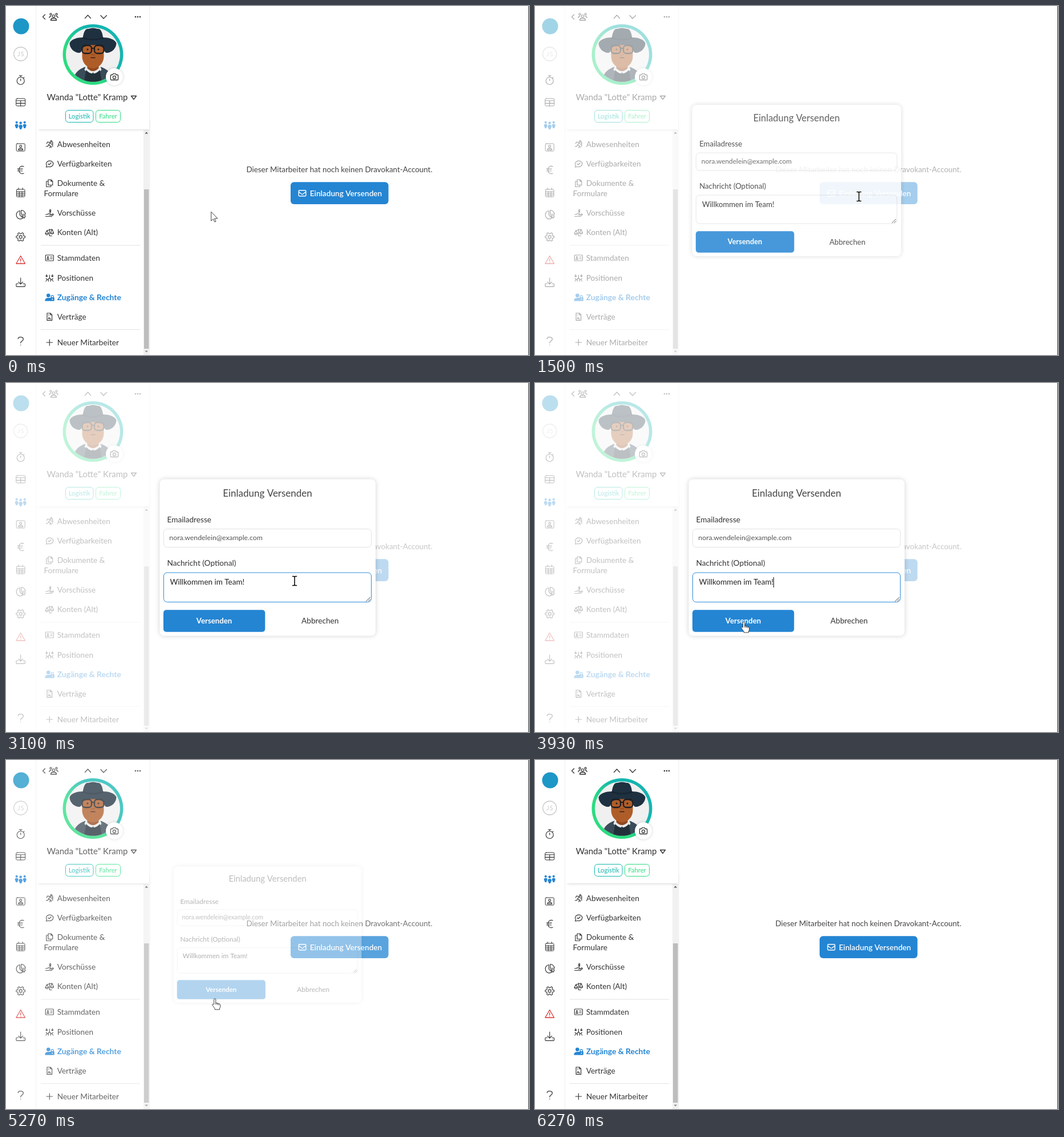
Write an HTML page with a canvas that moves like this. It is 917x611 px and loops after 7.26 s.

```html
<!DOCTYPE html>
<html lang="de">
<head>
<meta charset="utf-8">
<title>Einladung versenden</title>
<style>
html, body { margin: 0; width: 100%; height: 100%; overflow: hidden; background: #fff; }
canvas { display: block; }
</style>
</head>
<body>
<canvas id="stage" width="917" height="611"></canvas>
<script>
const W = 917, H = 611, LOOP = 7260;
const BLUE = '#2485d3', INK = '#333', TEAL = '#14b5b0', GREEN = '#2bdc80';
const FAMILY = 'Lato, "Open Sans", sans-serif';
const screen = document.getElementById('stage').getContext('2d');
const layer = document.createElement('canvas');
layer.width = W;
layer.height = H;
const layerCtx = layer.getContext('2d');
let c = screen;

// ---- drawing helpers ----
function at(x, y, draw) {
  c.save();
  c.translate(x, y);
  draw();
  c.restore();
}
function line(d, color = INK, width = 1.15) {
  c.strokeStyle = color;
  c.lineWidth = width;
  c.lineJoin = c.lineCap = 'round';
  c.stroke(new Path2D(d));
}
function fill(d, color = INK) {
  c.fillStyle = color;
  c.fill(new Path2D(d));
}
function disc(x, y, r, color) {
  c.beginPath();
  c.arc(x, y, r, 0, 7);
  c.fillStyle = color;
  c.fill();
}
function ring(x, y, r, color = INK, width = 1.15) {
  c.beginPath();
  c.arc(x, y, r, 0, 7);
  c.strokeStyle = color;
  c.lineWidth = width;
  c.stroke();
}
function box(x, y, w, h, r, paint, border, width = 1) {
  c.beginPath();
  c.roundRect(x, y, w, h, r);
  if (paint) { c.fillStyle = paint; c.fill(); }
  if (border) { c.strokeStyle = border; c.lineWidth = width; c.stroke(); }
}
function text(s, x, y, size = 13.65, color = INK, weight = 400, align = 'left') {
  c.font = `${weight} ${size}px ${FAMILY}`;
  c.textAlign = align;
  c.fillStyle = color;
  c.fillText(s, x, y + size * 0.355);
}
function person(x, y, s, color) {
  disc(x, y - 3.4 * s, 2 * s, color);
  box(x - 2.8 * s, y - 0.6 * s, 5.6 * s, 5 * s, 2 * s, color);
  box(x - 1.7 * s, y + 2 * s, 3.4 * s, 4.4 * s, s, color);
}

// ---- motion helpers ----
const clamp = v => Math.min(1, Math.max(0, v));
const span = (t, a, b) => clamp((t - a) / (b - a));
const smooth = u => u * u * (3 - 2 * u);
const bez = (u, a, b, d, e) =>
  a * (1 - u) ** 3 + 3 * b * u * (1 - u) ** 2 + 3 * d * u * u * (1 - u) + e * u ** 3;
function ease(x) {
  let lo = 0, hi = 1;
  for (let i = 0; i < 20; i++) {
    const mid = (lo + hi) / 2;
    if (bez(mid, 0, 0.25, 0.25, 1) < x) lo = mid; else hi = mid;
  }
  return bez(lo, 0, 0.1, 1, 1);
}
const along = (u, p, q, r, s) => [bez(u, p[0], q[0], r[0], s[0]), bez(u, p[1], q[1], r[1], s[1])];

// ---- left icon bar ----
function gear() {
  c.beginPath();
  for (let i = 0; i <= 96; i++) {
    const a = i / 96 * Math.PI * 2;
    const r = 6.7 + 1.1 * Math.tanh(3 * Math.cos(6 * a + Math.PI));
    c.lineTo(Math.sin(a) * r, Math.cos(a) * r);
  }
  c.strokeStyle = INK;
  c.lineWidth = 1.15;
  c.stroke();
  ring(0, 0, 2.5);
}
function nav() {
  disc(26.5, 35.5, 14, '#1d97c6');
  ring(25.7, 84, 12, '#c6c6c6', 1.3);
  c.letterSpacing = '1px';
  text('JS', 26.3, 84, 10.5, '#c8c8c8', 400, 'center');
  c.letterSpacing = '0px';
  at(25.7, 131, () => {
    ring(0, 0, 6.5);
    line('M0 0V-3.5M-2.5-9.3H2.5M0-9V-6.5M5-5L6.2-6.2');
  });
  at(25.7, 168.5, () => {
    box(-8, -6.5, 16, 13, 2, null, INK);
    line('M-8-2.8H8M-8 1.8H8M0-2.8V6.5');
  });
  person(18.7, 207.3, 1.05, BLUE);
  person(32.7, 207.3, 1.05, BLUE);
  box(21.7, 206, 8, 11, 3, '#fff');
  person(25.7, 208.6, 1.15, BLUE);
  at(25.7, 247.5, () => {
    box(-7.5, -6.5, 15, 13, 1.5, null, INK);
    ring(0, -1.8, 1.9);
    line('M-4 4.3Q-3.5 1.8-1.5 1.8H1.5Q3.5 1.8 4 4.3Z');
  });
  at(25.7, 287, () => line('M5.5-6C1-8-3-5-3 0S1 8 5.5 6M-5.5-1.7H3.5M-5.5 1.7H3'));
  at(25.7, 327, () => {
    box(-7.3, -6, 14.6, 13, 1.5, null, INK);
    line('M-7-2H7M-7 1H7M-7 4H7M-2.4-2V7M2.4-2V7M-3.5-8.5V-6M3.5-8.5V-6', INK, 1);
  });
  at(25.7, 365.5, () => {
    line('M-1.5-7A7.2 7.2 0 1 0 4 5.8L-1.5.4Z');
    line('M1-8A7.3 7.3 0 0 1 8.3-.8H1ZM2 1.5H8.3A7.5 7.5 0 0 1 6.2 5.8Z');
  });
  at(25.7, 404.3, gear);
  at(25.7, 445, () => line('M0-7.5L7.8 6H-7.8ZM0-2.5V1.5M0 3.8V4', '#d93636', 1.3));
  at(25.7, 484, () => line('M0-8V3M-3.8-.8L0 3L3.8-.8M-4 2H-6.5Q-7.8 2-7.8 3.3V6Q-7.8 7.3-6.5 7.3H6.5Q7.8 7.3 7.8 6V3.3Q7.8 2 6.5 2H4M5 4.7V4.8'));
  at(25.7, 586.5, () => line('M-4.5-4C-4-8 4.8-8 4.6-3C4.4 0 0 0 0 3.5M0 6.8V7', INK, 1.3));
  c.fillStyle = '#eee';
  c.fillRect(52, 0, 1, H);
  c.fillRect(251.5, 0, 1, H);
}

// ---- employee header ----
function face() {
  const dark = '#1d1d20';
  fill('M-35 50C-34 31-24 25-12 21H12C24 25 34 31 35 50Z', '#3a4b59');
  fill('M-13 21L-15 27L-4 36L0 31L4 36L15 27L13 21Z', '#e9ecec');
  fill('M-12 27Q0 40 12 27L16 50H-16Z', '#22303a');
  fill('M-10 8H10V24Q0 34-10 24Z', '#94491f');
  fill('M-19-20H19V3C19 15 10 24 0 24S-19 15-19 3Z', '#ae5d29');
  // hat: wide drooping brim below a dented crown
  fill('M-41-20C-38-27-28-30-17-30H17C28-30 38-27 41-20C41-11 33-3 24-3C21-3 20-6 19-10C14-19-14-19-19-10C-20-6-21-3-24-3C-33-3-41-11-41-20Z', '#1f3140');
  fill('M-18-27C-17-38-14-46-8-45Q0-48 8-45C14-46 17-38 18-27Z', '#1f3140');
  line('M-17.5-29Q0-23 17.5-29', '#172632', 2.5);
  box(-19, -16, 16.5, 14, 5, null, dark, 2.3);
  box(2.5, -16, 16.5, 14, 5, null, dark, 2.3);
  line('M-2.5-10Q0-12.5 2.5-10', dark, 2);
  disc(-9.5, -9, 1.5, dark);
  disc(9.5, -9, 1.5, dark);
  line('M-3-.5Q0 2 3-.5', '#94491f', 1.5);
  line('M-3.5 5.5H3.5', '#3a1f14', 1.6);
}
function avatar() {
  const g = c.createLinearGradient(178, 58, 122, 112);
  g.addColorStop(0.2, TEAL);
  g.addColorStop(0.8, GREEN);
  disc(152.5, 85, 53, g);
  disc(152.5, 85, 47.5, '#f0f0f0');
  c.save();
  c.beginPath();
  c.arc(152.5, 85, 47.5, 0, 7);
  c.clip();
  at(152.5, 85, face);
  c.restore();
  c.save();
  c.shadowColor = 'rgba(0,0,0,.2)';
  c.shadowBlur = 4;
  disc(190, 124, 15, '#fff');
  c.restore();
  at(190, 124.3, () => {
    line('M-5.3-3.8H-3.3L-2.3-5.6H2.3L3.3-3.8H5.3Q6.6-3.8 6.6-2.5V4Q6.6 5.2 5.3 5.2H-5.3Q-6.6 5.2-6.6 4V-2.5Q-6.6-3.8-5.3-3.8Z', INK, 1.3);
    ring(0, 0.6, 2.6, INK, 1.3);
  });
}
function header() {
  c.save();
  c.shadowColor = 'rgba(0,0,0,.14)';
  c.shadowBlur = 4;
  c.shadowOffsetY = 1;
  c.fillStyle = '#fff';
  c.fillRect(57, 200, 194, 15.5);
  c.restore();
  c.fillStyle = '#fff';
  c.fillRect(53, 0, 198, 215.5);
  line('M68.5 15L64.5 19L68.5 23M138.5 21.5L143.5 16L148.5 21.5M166 16.5L171 22L176.5 16.5', INK, 1.3);
  ring(78.5, 14.5, 1.6);
  ring(88.5, 14.5, 1.6);
  ring(83.5, 17.7, 2.2);
  line('M76 20.5Q76 18 78.8 18.2M91 20.5Q91 18 88.2 18.2M78.5 25Q79 21.5 81.5 21.5H85.5Q88 21.5 88.5 25Z', INK, 1.4);
  for (const x of [227, 231, 235]) disc(x, 19, 1.35, INK);
  avatar();
  text('Wanda "Lotte" Kramp', 142.5, 160, 15, INK, 400, 'center');
  line('M219.5 157.5H228.5L224 163.5Z', INK, 1.3);
  box(104.5, 182.5, 48.5, 21, 5, null, TEAL);
  text('Logistik', 128.7, 193, 11.3, TEAL, 400, 'center');
  box(157.5, 182.5, 43, 21, 5, null, GREEN);
  text('Fahrer', 179, 193, 11.3, GREEN, 400, 'center');
}

// ---- menu ----
const items = [
  ['Abwesenheiten', 242, 'M1.6-5a1.4 1.4 0 1 1 2.8 0a1.4 1.4 0 1 1-2.8 0M-5-1L-3.5-4L1-3L-1.5 1L1.5 3L.5 6.3M-1.5 1L-3 3.6L-6 4M1-3L3 0L6-.5M3 3V6M5.5-4V4'],
  ['Verfügbarkeiten', 276.5, 'M-6 5.5L-4.6 3A6.2 5.2 0 1 1-1.5 4.8Q-3.5 5.7-6 5.5M-2.5-.3L-.6 1.5L2.8-2'],
  ['Dokumente &', 310.5, 'M-2.3-6.5H2.5L5.5-3.5V3H-2.3ZM2.5-6.5V-3.5H5.5M-2.3-3.5H-5.5V6H2.5V3'],
  ['Vorschüsse', 362.5, 'M-6.8 2.5H-4L-2 1H1.5L2.5 2.5L1.5 3.5H-1M2.5 3.5L5.8 1.3L7 2.5L3 6H-6.8M2.8-5.2C.3-6.3-.8-4 1-3.6C3.6-3 2.5-.8-.6-2M1.1-6.8V-.4'],
  ['Konten (Alt)', 396.5, 'M0-6V6H4M-4-3.5L4-5.5M-4.5-3.5L-7.3 2H-1.7ZM4.5-5.5L1.7 1H7.3ZM-7 2.5Q-4.5 6-2 2.5M2 1.5Q4.5 4.5 7 1.5'],
  ['Stammdaten', 441, 'M-6-5H6Q7-5 7-4V4Q7 5 6 5H-6Q-7 5-7 4V-4Q-7-5-6-5M-4.6 2.5Q-4.4.7-2.8.7T-1 2.5ZM-3.8-1.5a1 1 0 1 1 2 0a1 1 0 1 1-2 0M1.5-1.5H4.8M1.5 1.5H4.8'],
  ['Positionen', 476, 'M-5-6V-2M-6.5-3.5L-5-2L-3.5-3.5M5-6V-2M3.5-3.5L5-2L6.5-3.5M0-5V-1M-6 1L-4 3L-6.5 6M6 1L4 3L6.5 6M-2 6V2L0 0L2 2V6M-4 3H-2M2 3H4'],
  ['Zugänge & Rechte', 510, ''],
  ['Verträge', 544, 'M-4.3-6.3H1.5L4.3-3.5V6.3H-4.3ZM1.3-6.3V-3.3H4.3M-2-3H-1M-2.2 3.8L-.8 1.2L.4 3.8H2.2'],
  ['Neuer Mitarbeiter', 589, 'M-5.3 0H5.3M0-5.3V5.3']
];
function menu() {
  for (const [label, y, icon] of items) {
    if (icon) {
      text(label, 89.7, y);
      at(76.3, y, () => line(icon));
    } else {
      text(label, 89.7, y, 13.85, BLUE, 700);
      at(76.3, y, () => {
        disc(-2, -3.3, 3.3, BLUE);
        fill('M-8 6.5C-8 2-5 1-2 1H2.5V6.5Z', BLUE);
        box(1.5, 0, 7, 6.5, 1, BLUE);
        line('M3 0V-1.5A1.9 1.9 0 0 1 6.8-1.5V0', BLUE, 1.3);
        disc(5, 3.2, 1, '#fff');
      });
    }
  }
  text('Formulare', 66.5, 328);
  c.fillStyle = '#e2e2e2';
  c.fillRect(61, 418.5, 174, 1);
  c.fillRect(61, 566, 174, 1);
  c.fillStyle = '#f1f1f1';
  c.fillRect(241, 217, 10.5, 394);
  c.fillStyle = '#bdbdbd';
  c.fillRect(242, 321, 8.5, 279);
  fill('M243.5 223.5L246.2 220.5L249 223.5Z', '#505050');
  fill('M243.5 603.5L246.2 606.5L249 603.5Z', '#8a8a8a');
}

function page() {
  c.fillStyle = '#fff';
  c.fillRect(0, 0, W, H);
  menu();
  header();
  nav();
  text('Dieser Mitarbeiter hat noch keinen Dravokant-Account.', 584.5, 286, 13.4, '#444', 400, 'center');
  box(499, 308.3, 171.6, 38.6, 6, BLUE);
  at(519.5, 327.7, () => line('M-5-5H5Q6.3-5 6.3-3.7V3.7Q6.3 5 5 5H-5Q-6.3 5-6.3 3.7V-3.7Q-6.3-5-5-5M-6.3-2.3L-1 1.6Q0 2.2 1 1.6L6.3-2.3', '#fff', 1.4));
  text('Einladung Versenden', 532.7, 328, 13.65, '#fff', 600);
}

// ---- dialog ----
function dialog(t, scale) {
  c.clearRect(0, 0, W, H);
  c.save();
  c.translate(459, 305.5);
  c.scale(scale, scale);
  c.translate(-459, -305.5);
  c.save();
  c.shadowColor = 'rgba(0,0,0,.18)';
  c.shadowBlur = 8;
  box(269.5, 168.5, 378.5, 274, 8, '#fff');
  c.restore();
  text('Einladung Versenden', 458.5, 193, 17, '#444', 400, 'center');
  text('Emailadresse', 282.5, 239.5);
  box(276.5, 255.5, 364, 32, 6, null, '#e2e2e2');
  text('nora.wendelein@example.com', 286.3, 271, 12.3, '#555');
  text('Nachricht (Optional)', 282.5, 315.5);
  const focus = t >= 2500 && t < 4420;
  box(276.5, 332, 364, 51.5, 6, null, focus ? '#2f8cd6' : '#e2e2e2');
  text('Willkommen im Team!', 287.5, 348.7, 13.5, '#222');
  if (focus && (t < 3100 || (t >= 3630 && t < 4170))) {
    c.fillStyle = '#111';
    c.fillRect(418, 340, 1, 18);
  }
  box(276, 397.3, 178.3, 38.5, 5, BLUE);
  text('Versenden', 365, 416.5, 13.2, '#fff', 700, 'center');
  text('Abbrechen', 550.7, 416.5, 13.65, INK, 400, 'center');

  const busy = smooth(span(t, 4420, 4600)) * (1 - smooth(span(t, 5000, 5130)));
  if (busy) {
    box(270, 169, 377.5, 273, 8, `rgba(255,255,255,${0.7 * busy})`);
    const a = (104 + (t - 4870) * 0.36) * Math.PI / 180;
    c.globalAlpha = busy;
    c.beginPath();
    c.arc(459, 305.5, 16.7, a, a + 1.3);
    c.strokeStyle = BLUE;
    c.lineWidth = 3.6;
    c.lineCap = 'butt';
    c.stroke();
    c.globalAlpha = 1;
  }
  line('M631.5 382L638.5 375.5M635.5 382L638.5 379', '#444', 1);
  c.restore();
}

// ---- pointer ----
const START = [359.7, 360.7], CLICK = [568, 333.5], FIELD = [506, 346.5], SEND = [366.2, 418];
function place(t) {
  if (t < 970) return along(smooth(span(t, 430, 970)), START, [400, 385], [540, 375], CLICK);
  if (t < 3370) {
    const u = 1 - (1 - span(t, 1990, 2270)) ** 1.3;
    const v = u * (0.7 + 0.3 * u);
    return [CLICK[0] + (FIELD[0] - CLICK[0]) * v, CLICK[1] + (FIELD[1] - CLICK[1]) * v];
  }
  if (t < 5840) return along(smooth(span(t, 3370, 3930)), FIELD, [300, 350], [205, 410], SEND);
  const u = span(t, 5840, 6270) ** 1.3;
  return along(u, SEND, [330, 460], [190, 520], [122, 615]);
}
function shape(t, x, y) {
  if (t < 1260) return x > 499 && y < 347 ? 'hand' : 'arrow';
  if (t < 3370) return 'beam';
  if (t < 4420) {
    if (y < 384 && x > 276) return 'beam';
    return y > 397 ? 'hand' : 'arrow';
  }
  return t >= 5130 && t < 5340 ? 'hand' : 'arrow';
}
function pointer(t) {
  if (t >= 6270) return;
  const [x, y] = place(t);
  const kind = shape(t, x, y);
  at(x, y, () => {
    if (kind === 'beam') {
      c.globalCompositeOperation = 'difference';
      line('M-3.5-8H-1.5Q0-8 0-6.5Q0-8 1.5-8H3.5M0-6.5V6.5M-3.5 8H-1.5Q0 8 0 6.5Q0 8 1.5 8H3.5', '#fff', 1.5);
      return;
    }
    const d = kind === 'hand'
      ? 'M-1.6 9.5V1.5a1.6 1.6 0 0 1 3.2 0V7.3l2.5.4 2.5.7 2.2 1 .7 1.4v3.7l-1.2 2.4v2H0v-1.5l-2-3-2.5-3.5c-.6-1.2.7-2.2 1.7-1.2Z'
      : 'M0 0V15.5L3.7 12.2L6.2 17.4L8.3 16.4L5.9 11.3H10.9Z';
    fill(d, '#fff');
    line(d, '#222', 0.85);
    if (kind === 'hand') line('M1.6 7.5V10M4.2 8V10.5M6.7 9V11', '#222', 0.8);
  });
}

function draw(now) {
  const t = now % LOOP;
  const open = ease(span(t, 1300, 1670)) * (1 - ease(span(t, 5130, 5500)));
  c = screen;
  page();
  if (open > 0) {
    c.fillStyle = `rgba(255,255,255,${0.7 * open})`;
    c.fillRect(0, 0, W, H);
    c = layerCtx;
    dialog(t, 0.8 + 0.2 * open);
    c = screen;
    c.globalAlpha = open;
    c.drawImage(layer, 0, 0);
    c.globalAlpha = 1;
  }
  c.fillStyle = '#333';
  c.fillRect(916, 0, 1, H);
  pointer(t);
}

let origin;
function tick(now) {
  origin ??= now;
  draw(now - origin);
  requestAnimationFrame(tick);
}
requestAnimationFrame(tick);
</script>
</body>
</html>
```
